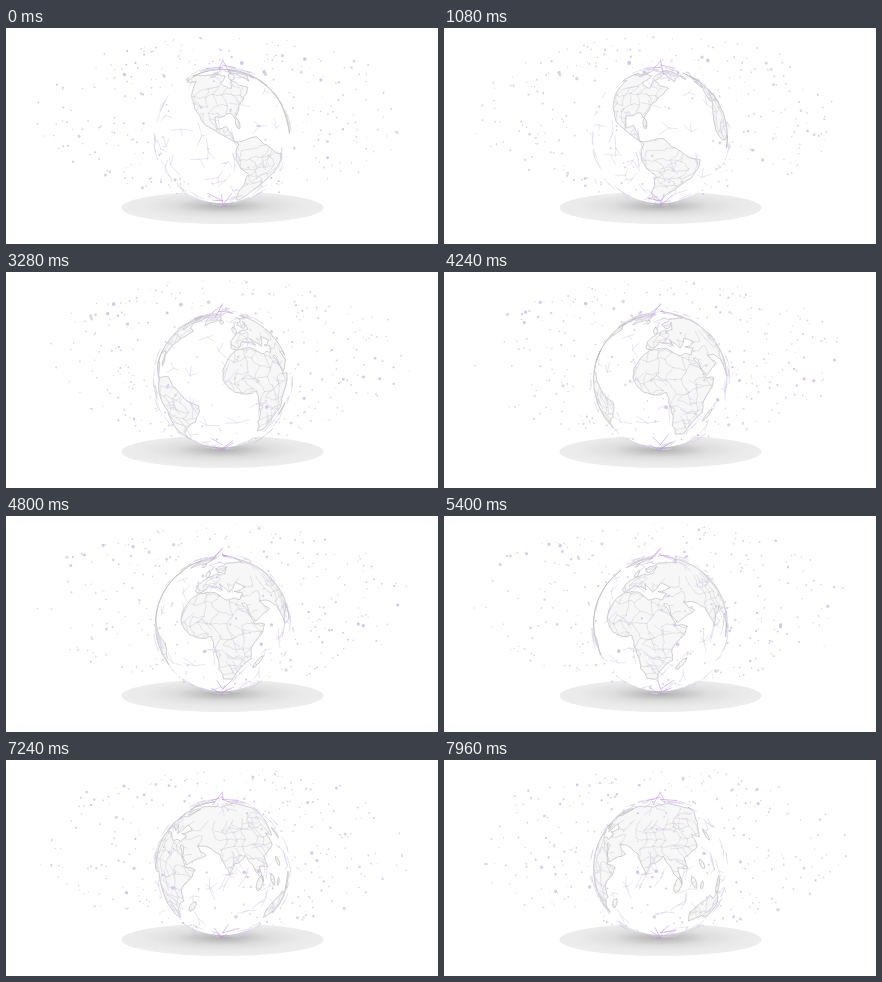
Recreate the animation shown at these times as an HTML page. Size 432 px wide and 216 px high, loop 8 s.

```html
<!DOCTYPE html>
<html lang="en">
<head>
<meta charset="utf-8">
<title>Rotating globe</title>
<style>
html, body { margin: 0; width: 100%; height: 100%; overflow: hidden; background: #fff; }
svg { display: block; width: 100vw; height: 100vh; }
path { fill: none; stroke-linejoin: round; stroke-linecap: round; }
</style>
</head>
<body>
<svg viewBox="0 0 432 216">
  <defs>
    <radialGradient id="shade" cx=".5" cy=".44" r=".56">
      <stop offset="0" stop-color="#b0b0b0"/>
      <stop offset=".2" stop-color="#c6c6c6"/>
      <stop offset=".42" stop-color="#dedede"/>
      <stop offset=".7" stop-color="#eaeaea"/>
      <stop offset="1" stop-color="#eeeeee"/>
    </radialGradient>
    <clipPath id="coast"></clipPath>
  </defs>
  <ellipse cx="216.5" cy="179.8" rx="101" ry="16.3" fill="url(#shade)"/>
  <g id="back"></g>
  <circle cx="216.5" cy="108.3" r="67" fill="#fff"/>
  <g id="globe"></g>
  <g id="countries" clip-path="url(#coast)"></g>
  <g id="front"></g>
</svg>
<script>
const LOOP = 8000, STEP = 40, TURN = 16000, START = -91;
const CX = 216.5, CY = 108.3, R = 67, DIST = 6;
const FOCAL = R * Math.sqrt(DIST * DIST - 1), RIM = 1 / DIST;
const RAD = Math.PI / 180, TILT = 13 * RAD;
const { sin, cos, asin, sqrt, hypot, floor, max } = Math;

let seed = 11;
function rand(a = 0, b = 1) {
  seed = (seed * 16807) % 2147483647;
  return a + (b - a) * seed / 2147483647;
}

function vec(lon, lat, r = 1) {
  const c = cos(lat * RAD) * r;
  return [c * sin(lon * RAD), r * sin(lat * RAD), c * cos(lon * RAD)];
}

// Key points (longitude, latitude); rough() adds the ragged coast between them.
const oldWorld = [
  [32,31], [20,31], [10,37], [-6,35], [-17,20], [-16,12], [-8,4], [9,4], [13,-12], [18,-34], [27,-34],
  [40,-15], [39,-6], [51,11], [42,12], [33,28], [36,28], [43,14], [59,22], [50,29], [70,23], [77,8],
  [81,16], [90,22], [98,9], [104,1], [101,13], [109,12], [107,20], [121,28], [119,38], [127,35],
  [141,53], [160,60], [180,66], [140,73], [104,78], [70,70], [26,71], [6,61], [12,56], [24,65],
  [20,55], [8,54], [-4,48], [-9,43], [-9,37], [-5,36], [4,43], [17,39], [14,45], [23,37], [31,46],
  [40,41], [28,38], [36,36]];
const newWorld = [
  [-168,66], [-128,70], [-85,69], [-94,59], [-80,52], [-77,62], [-57,52], [-66,45], [-76,36], [-81,26],
  [-84,30], [-97,27], [-95,18], [-88,20], [-84,15], [-82,9], [-77,9], [-64,11], [-50,0], [-35,-7],
  [-40,-22], [-58,-37], [-68,-54], [-74,-50], [-70,-18], [-81,-5], [-79,7], [-86,11], [-95,16],
  [-106,22], [-124,42], [-135,59], [-158,57]];
const australia = [[114,-24], [131,-12], [136,-16], [142,-11], [153,-27], [147,-38], [131,-32], [116,-35]];
const greenland = [[-45,60], [-65,77], [-30,83], [-20,71]];
// Islands: longitude, latitude, size.
const islands = [[-79,22,4], [-2,54,4], [-19,65,3], [47,-19,6], [101,0,6], [114,1,5], [121,-2,3],
  [140,-5,7], [122,14,4], [138,36,5], [-72,68,6], [-110,71,5]];

// Midpoint displacement: short steps with a seeded wobble.
function rough([a, b], [c, d], wobble) {
  const len = hypot(c - a, d - b);
  if (len < 3) return [[a, b]];
  const k = rand(-wobble, wobble);
  const mid = [(a + c) / 2 - (d - b) * k, (b + d) / 2 + (c - a) * k];
  return [...rough([a, b], mid, wobble), ...rough(mid, [c, d], wobble)];
}
const onSphere = pts => pts.map(p => vec(...p));
const coast = pts => onSphere(pts.flatMap((p, i) => rough(p, pts[(i + 1) % pts.length], .11)));

function island([lon, lat, size]) {
  const lean = rand(50, 130) * RAD, thin = rand(.3, .5);
  return coast(Array.from({ length: 8 }, (_, i) => {
    const u = size * cos(i * 45 * RAD), v = size * thin * sin(i * 45 * RAD);
    return [lon + (u * cos(lean) - v * sin(lean)) / cos(lat * RAD), lat + u * sin(lean) + v * cos(lean)];
  }));
}
const rings = [...[oldWorld, newWorld, australia, greenland].map(coast), ...islands.map(island)];

// Country borders: a jittered brick net, clipped to the land.
const borders = [];
const COLS = 36, ROWS = 12;
const net = Array.from({ length: ROWS }, (_, row) => Array.from({ length: COLS }, (_, col) =>
  [-180 + (col + row % 2 / 2) * 10 + rand(-3, 3), -36 + row * 8 + rand(-2.5, 2.5)]));
const link = (a, b) => borders.push(onSphere([...rough(a, b, .15), b]));
for (let row = 0; row < ROWS - 1; row++) {
  for (let col = 0; col < COLS - 1; col++) {
    if (rand() < .72) link(net[row][col], net[row][col + 1]);
    if (rand() < .78) link(net[row][col], net[row + 1][col]);
  }
}

// Small branching threads that float just above the surface.
function thread(lon, lat, size) {
  const r = rand(1, 1.05), lines = [];
  let turn = rand(0, 360);
  for (let i = 0; i < 3; i++) {
    const len = rand(.4, 1) * size, wide = len / max(.25, cos(lat * RAD));
    const end = [lon + wide * sin(turn * RAD), lat + len * cos(turn * RAD)];
    lines.push([vec(lon, lat, r), vec(...end, r)]);
    if (i !== 1) [lon, lat] = end;
    turn += rand(-80, 80);
  }
  return lines;
}
const threads = [], polar = [];
for (let i = 0; i < 120; i++) threads.push(...thread(rand(0, 360), asin(rand(-.97, .97)) / RAD, 10));
for (let i = 0; i < 22; i++) threads.push(...thread(rand(0, 360), rand(58, 80), 9));
for (let i = 0; i < 26; i++) threads.push(...thread(rand(0, 360), rand(-75, -45), 9));
for (const side of [1, -1]) {
  for (let i = 0; i < 5; i++) {
    const lon = i * 72 + rand(0, 40);
    polar.push([vec(lon, side * 90, rand(1.02, 1.14)), vec(lon, side * rand(74, 82), rand(.96, 1.04))]);
  }
}

const dots = Array.from({ length: 320 }, () => {
  const h = rand(-1, 1);
  return {
    y: 88 + h * 76, reach: 193 * sqrt(1 - h * h * .9) * sqrt(rand(.25, 1)), turn: rand(0, 360),
    r: rand() < .12 ? rand(1.2, 1.7) : rand(.55, 1.05), tone: rand() < .35 ? 1 : 0
  };
});

function layer(id, attrs) {
  const el = document.createElementNS("http://www.w3.org/2000/svg", "path");
  for (const key in attrs) el.setAttribute(key, attrs[key]);
  document.getElementById(id).append(el);
  return el;
}
const TONES = ["#dcd8e0", "#d6c9e8"];
const backDots = TONES.map(c => layer("back", { style: "fill:" + c }));
const mask = layer("coast", {});
const land = layer("globe", { style: "fill:#f7f7f7", stroke: "#b8b8b8", "stroke-width": .65 });
const inner = layer("countries", { stroke: "#cfcfcf", "stroke-width": .55 });
const web = layer("front", { stroke: "#d9cfe6", "stroke-width": .9, opacity: .6 });
const star = layer("front", { stroke: "#bd96e0", "stroke-width": .9, opacity: .65 });
const frontDots = TONES.map(c => layer("front", { style: "fill:" + c }));

let sinTurn, cosTurn;
function project([vx, vy, vz]) {
  const x = vx * cosTurn - vz * sinTurn, depth = vx * sinTurn + vz * cosTurn;
  const y = vy * cos(TILT) - depth * sin(TILT), z = vy * sin(TILT) + depth * cos(TILT);
  const k = FOCAL / (DIST - z);
  return { x: CX + x * k, y: CY - y * k, z, seen: z > RIM };
}
const at = p => p.x.toFixed(2) + " " + p.y.toFixed(2);
function onRim(p) {
  const dx = p.x - CX, dy = p.y - CY, k = R / hypot(dx, dy);
  return { x: CX + dx * k, y: CY + dy * k };
}

// Closed outline; hidden runs are replaced by an arc along the rim.
function ringPath(ring) {
  const pts = ring.map(project), n = pts.length;
  if (!pts.some(p => p.seen)) return "";
  const first = max(0, pts.findIndex((p, i) => p.seen && !pts[(i + n - 1) % n].seen));
  let d = "", exit = null;
  for (let i = 0; i <= n; i++) {
    const p = pts[(first + i) % n], prev = pts[(first + i + n - 1) % n];
    if (p.seen) {
      if (exit) {
        const a = onRim(exit), b = onRim(prev);
        const sweep = (a.x - CX) * (b.y - CY) - (a.y - CY) * (b.x - CX) > 0 ? 1 : 0;
        d += `L${at(a)}A${R} ${R} 0 0 ${sweep} ${at(b)}`;
        exit = null;
      }
      d += (d ? "L" : "M") + at(p);
    } else if (!exit) exit = p;
  }
  return d + "Z";
}

function linePath(line, limit) {
  let d = "", open = false;
  for (const p of line.map(project)) {
    if (p.z > limit) d += (open ? "L" : "M") + at(p);
    open = p.z > limit;
  }
  return d;
}

const draw = (el, d) => el.setAttribute("d", d);
const lines = (list, limit) => list.map(l => linePath(l, limit)).join("");
const disc = (x, y, r) =>
  `M${(x - r).toFixed(2)} ${y.toFixed(2)}a${r} ${r} 0 1 0 ${2 * r} 0a${r} ${r} 0 1 0 ${-2 * r} 0`;

function render(t) {
  const turn = START + t * 360 / TURN;
  sinTurn = sin(turn * RAD);
  cosTurn = cos(turn * RAD);
  const shore = rings.map(ringPath).join("");
  draw(land, shore);
  draw(mask, shore);
  draw(inner, lines(borders, RIM));
  draw(web, lines(threads, .05));
  draw(star, lines(polar, -.45));

  const back = ["", ""], front = ["", ""];
  for (const p of dots) {
    const a = (p.turn - turn) * RAD, z = cos(a);
    const r = +(p.r * (1 + .2 * z)).toFixed(2);
    (z > 0 ? front : back)[p.tone] += disc(CX + p.reach * sin(a), p.y + 5 * z, r);
  }
  TONES.forEach((_, i) => { draw(backDots[i], back[i]); draw(frontDots[i], front[i]); });
}

function tick(now) {
  render(floor((now % LOOP) / STEP) * STEP);
  requestAnimationFrame(tick);
}
render(0);
requestAnimationFrame(tick);
</script>
</body>
</html>
```
